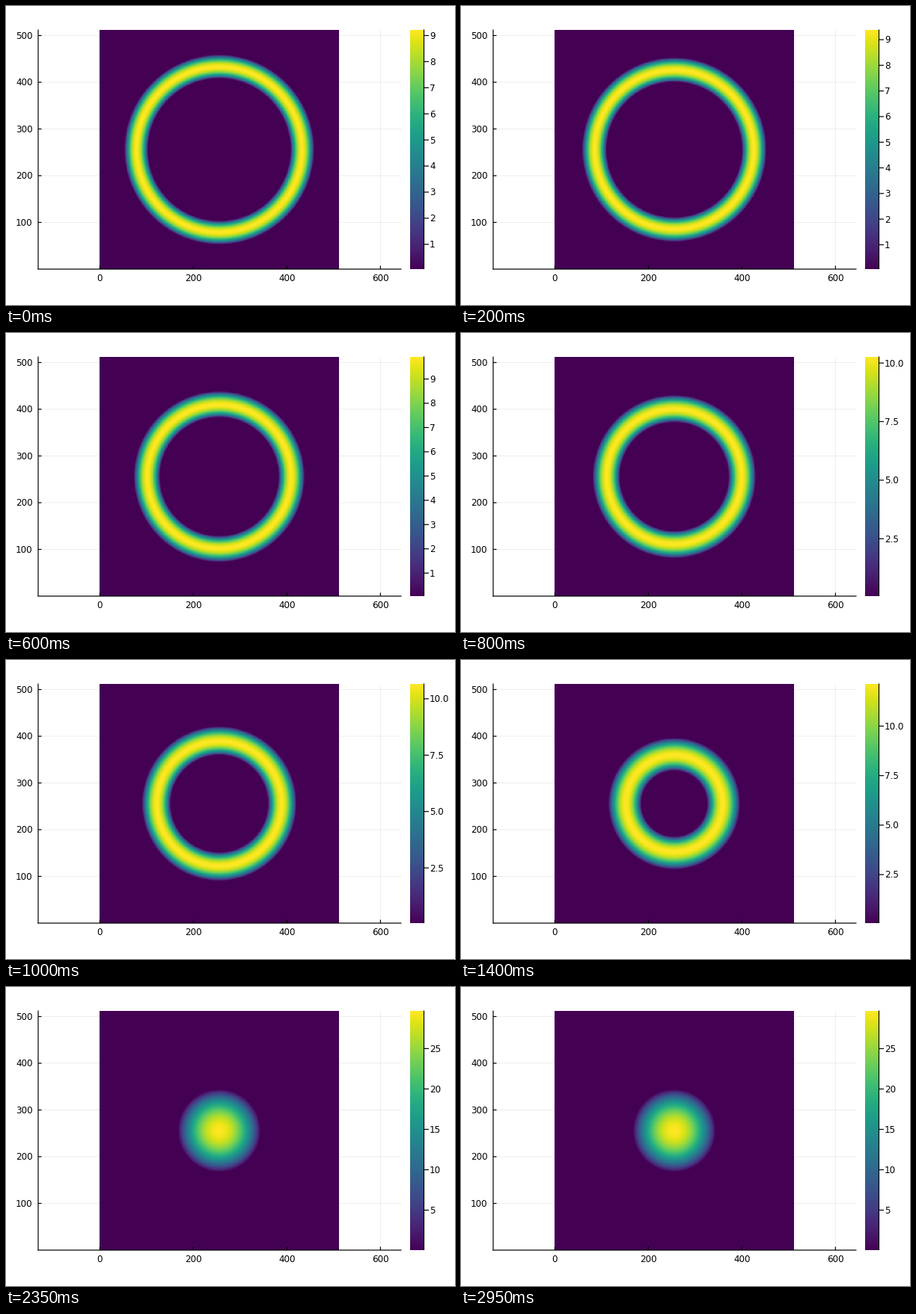
Animation, 600 px wide and 400 px high, one loop 4.95 s. Source, as a matplotlib script:

```python
import numpy as np
import matplotlib.pyplot as plt
from matplotlib.animation import FuncAnimation

W, H, DPI = 600, 400, 100
STEP, FRAMES = 50, 99
TOP, BASE, SCALE = 32, 352, 0.625      # plot area in pixels, pixels per cell
FLOOR = 0.05                           # lowest value on the colour scale
PX = 72 / DPI

# Ring radii (px) over time; the squares shrink almost evenly
T_RING = np.array([0, 200, 600, 1000, 1400, 1650]) / 1000
OUTER = np.polyfit(T_RING, np.array([127, 123, 114.5, 103, 88.3, 72.5]) ** 2, 4)
INNER = np.polyfit(T_RING, np.array([95, 90.5, 79, 65, 44, 19]) ** 2, 3)
T_PEAK = [0, 200, 400, 600, 650, 800, 1000, 1200, 1400, 1500, 1650, 1700, 1750, 1800]
PEAK = [9.215, 9.38, 9.62, 9.91, 10.003, 10.26, 10.66, 11.29, 12.13, 12.68,
        13.7, 17.0, 24.3, 28.6]
CLOSE, SETTLE = 1700, 1800

cells = (np.arange(512) - 255.5) * SCALE
rr = cells[:, None] ** 2 + cells[None, :] ** 2


def decay(t):
    return np.exp(-(t - SETTLE) / 110)


def peak(t):
    return np.interp(t, T_PEAK, PEAK) if t <= SETTLE else 29.67 - 1.07 * decay(t)


def ring(t):
    """Film of constant pressure between two contact circles."""
    b = np.polyval(OUTER, t / 1000)
    a = max(np.polyval(INNER, t / 1000), 1)
    k = (b - a) / np.log(b / a)
    top = b - k + k * np.log(k / b)
    return (b - rr + k * np.log(rr / b)) / top


def drop(t):
    if t < SETTLE:
        radius = np.interp(t, [CLOSE, 1750, SETTLE], [67, 61, 56.3])
    else:
        radius = 55.25 + 1.05 * decay(t)
    power = 1.4 if t < 1750 else 1
    return 1 - (rr / radius ** 2) ** power


def film(t):
    return np.clip(ring(t) if t < CLOSE else drop(t), 0, 1)


fig = plt.figure(figsize=(W / DPI, H / DPI), dpi=DPI, facecolor="white")
ax = fig.add_axes([0, 0, 1, 1])
ax.axis("off")


def line(xs, ys, width=1.2, **kw):
    kw = {"color": "black", "zorder": 4, **kw}
    return ax.plot(xs, ys, lw=width * PX, solid_capstyle="butt", snap=False, **kw)[0]


def label(x, y, s, ha):
    return ax.text(x, y + 4.4, s, ha=ha, va="baseline", fontsize=12 * PX,
                   family="DejaVu Sans", color="black", zorder=5)


def picture(data, extent):
    return ax.imshow(data, extent=extent, cmap="viridis", vmin=0, vmax=1,
                     origin="lower", interpolation="nearest", aspect="auto", zorder=2)


heat = picture(film(0), (125, 445, BASE, TOP))
picture(np.linspace(0, 1, 256)[:, None], (540, 558, BASE, TOP))

for v in range(0, 601, 200):
    x = 125 + v * SCALE + 0.4
    line([x, x], [TOP, BASE], 1, alpha=0.07, zorder=1)
    line([x, x], [BASE, BASE - 4.5])
    label(x, 363.5, str(v), "center")
for v in range(100, 501, 100):
    y = BASE - v * SCALE
    line([43, 528.5], [y, y], 1, alpha=0.07, zorder=1)
    line([43, 47.5], [y, y])
    label(35.5, y, str(v), "right")
line([43, 43], [TOP - 0.5, BASE + 0.5])
line([42.5, 528.5], [BASE, BASE])
line([558.5, 558.5], [TOP - 0.5, BASE])

marks = [(line([558.5, 565], [0, 0]), label(566, 0, "", "left")) for _ in range(9)]

ax.set_xlim(0, W)
ax.set_ylim(H, 0)


def update(i):
    t = i * STEP
    top = peak(t)
    heat.set_data(film(t))
    step = 1 if top < 10 else 2.5 if top < 15 else 5
    for n, (tick, text) in enumerate(marks, 1):
        v = n * step
        shown = v <= top
        tick.set_visible(shown)
        text.set_visible(shown)
        y = BASE - (BASE - TOP) * (v - FLOOR) / (top - FLOOR)
        tick.set_ydata([y, y])
        text.set_y(y + 4.4)
        text.set_text(f"{v:.1f}" if step == 2.5 else str(v))
    return []


anim = FuncAnimation(fig, update, frames=FRAMES, interval=STEP,
                     repeat=True, repeat_delay=0, blit=False)
plt.show()
```
